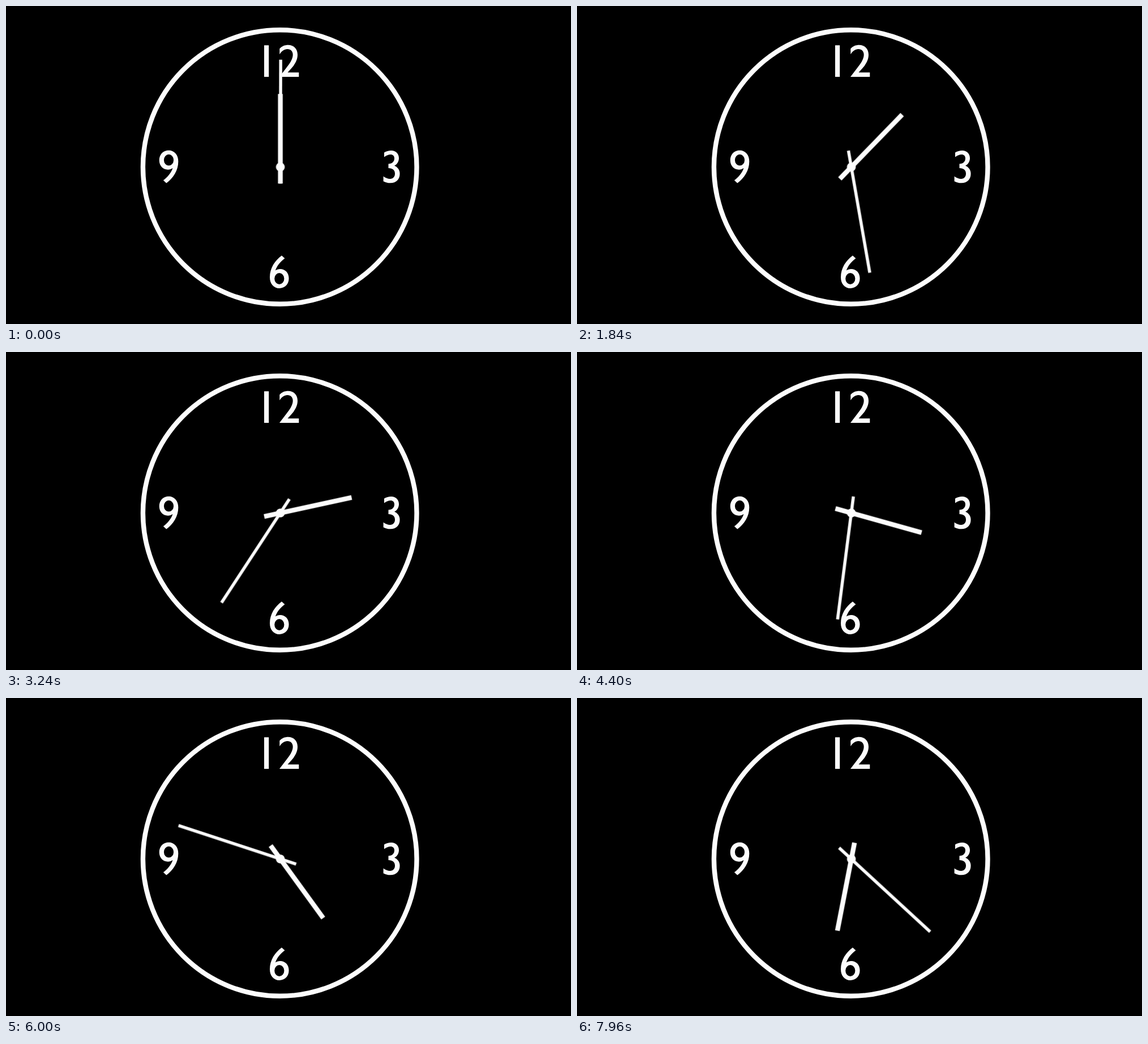
An HTML page for the animation above (8 s loop, 998 by 561 pixels).

```html
<!DOCTYPE html>
<html lang="en">
<head>
<meta charset="utf-8">
<title>Clock</title>
<style>
  html, body {
    margin: 0;
    width: 100%;
    height: 100%;
    overflow: hidden;
    background: #000;
  }

  svg {
    display: block;
    width: 100%;
    height: 100%;
    fill: #fdfdfd;
  }

  .ring {
    fill: none;
    stroke: #fdfdfd;
    stroke-width: 8.4;
  }

  /* 25 positions a second; the minute hand turns 12 times as fast as the hour hand */
  .hand {
    transform-origin: 0 0;
    animation: turn 8s steps(200) infinite;
  }
  .hour { --start: 0deg; --sweep: 192deg; }
  .minute { --start: 0.15deg; --sweep: 2304deg; }

  @keyframes turn {
    from { transform: rotate(var(--start)); }
    to { transform: rotate(calc(var(--start) + var(--sweep))); }
  }
</style>
</head>
<body>
<svg viewBox="0 0 998 561" role="img" aria-label="Clock face with the numerals 12, 3, 6 and 9">
  <defs>
    <path id="six" fill-rule="evenodd" d="M487 440.3C475 449 466 462.5 466 478.5C466 490 472.8 498 482.8 498
      C492.8 498 499.6 490.8 499.6 480.6C499.6 470.8 493.2 464 484.3 464C481 464 478.2 464.9 475.8 466.6
      C478.5 458.5 484.5 451 492.4 445.2Z
      M474.2 481a8.6 9.9 0 1 0 17.2 0a8.6 9.9 0 1 0 -17.2 0Z"/>
  </defs>

  <circle class="ring" cx="483.7" cy="284" r="241.8"/>

  <g class="numerals">
    <rect x="456" y="69.3" width="8.2" height="55.7"/>
    <path d="M483 125H517.3V117.3H497.5L504.5 109.5C511 102 515 94.5 515 86C515 76 508.5 68.7 498.5 68.7
      C492.5 68.7 487.5 70.7 483.3 75.2V85.2C487 79.5 491.5 76 497 76C503 76 506.7 80 506.7 86
      C506.7 92 503 99.5 496 108Z"/>
    <path d="M668 258.6C671.5 256.2 676 254.9 680.5 254.9C688.5 254.9 694 260.5 694 268.3
      C694 274.5 691 279.2 686 281.8C692 284.3 695.6 289.5 695.6 296C695.6 306 688.8 312.3 679 312.3
      C674.5 312.3 670 311.2 666.6 309.2V300.4C670.5 303.2 674.5 304.9 678.5 304.9
      C683.8 304.9 687 301.2 687 295.8C687 289.5 682.8 286 675.5 286V278.6C682 278.6 686 274.5 686 268.8
      C686 264.6 683.3 262 679.3 262C675.8 262 671.8 263.5 668 266.5Z"/>
    <use href="#six"/>
    <use href="#six" transform="translate(770.3 752.7) rotate(180)"/>
  </g>

  <g transform="translate(484.6 284)">
    <rect class="hand hour" x="-4.2" y="-128.8" width="8.4" height="158"/>
    <rect class="hand minute" x="-2.6" y="-189.3" width="5.4" height="218.6"/>
    <circle r="7.8"/>
  </g>
</svg>
</body>
</html>
```
